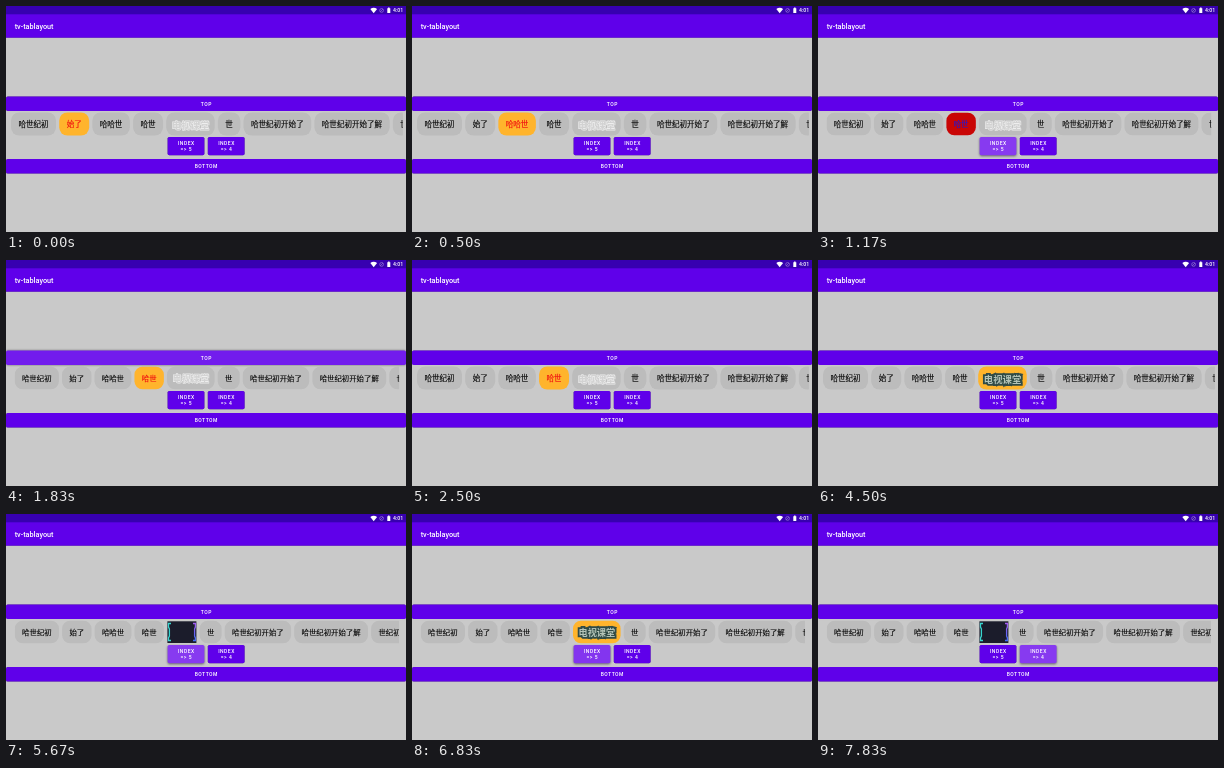
Animation, 400 px wide and 226 px high, one loop 8000 ms. Source, as an HTML page:

```html
<!DOCTYPE html>
<html lang="zh">
<head>
<meta charset="utf-8">
<title>tv-tablayout</title>
<style>
  html, body { margin: 0; width: 100%; height: 100%; overflow: hidden; background: #c9c9c9; }
  svg { display: block; width: 100%; height: 100%; }
  text { font-family: Roboto, sans-serif; font-weight: 500; fill: #fff; }
  .raised { filter: drop-shadow(0 .7px .6px #0007); }
  .label { font-size: 5px; letter-spacing: .5px; text-anchor: middle; }
  .tab text { font: 400 7.4px "Noto Sans CJK SC", "Noto Sans CJK", sans-serif; stroke-width: .15; }
  .tab .art { font-size: 9.2px; font-weight: 700; paint-order: stroke; }
</style>
</head>
<body>
<svg id="stage" viewBox="0 0 400 226" preserveAspectRatio="none">
  <defs>
    <clipPath id="rowClip"><rect x="8.8" y="106" width="384.2" height="24"/></clipPath>
    <linearGradient id="edge" x2="0" y2="1">
      <stop stop-color="#a35cf0"/><stop offset="1" stop-color="#3f6df5"/>
    </linearGradient>
  </defs>
  <rect width="400" height="226" fill="#c9c9c9"/>
  <rect class="raised" width="400" height="31.7" fill="#5f00ea"/>
  <rect width="400" height="8.3" fill="#3700b0"/>
  <text x="8.7" y="22.8" font-size="7.3">tv-tablayout</text>
  <path d="M364.3 3q3.4-2.5 6.8 0l-3.4 4.3z" fill="#fff"/>
  <g fill="none" stroke="#a48bd8" stroke-width=".6">
    <circle cx="375.6" cy="4.4" r="1.9"/><path d="M374.3 5.7l2.6-2.6"/>
  </g>
  <path d="M381.3 2.2h.8v-.6h1.4v.6h.8v4.9h-3z" fill="#fff"/>
  <text x="387" y="6.3" font-size="5.2">4:01</text>
  <g id="row"><g id="tabs" clip-path="url(#rowClip)"></g></g>
  <g id="buttons"></g>
</svg>
<script>
const LOOP = 8000, PAD = 7.3, GAP = 3.1, FONT = 7.4, ART_WIDTH = 47.6, PHOTO_WIDTH = 29.5;
const ART = 4;
const titles = ['哈世纪初', '始了', '哈哈世', '哈世', '电视课堂', '世', '哈世纪初开始了', '哈世纪初开始了解', '世纪初开始了'];

// [start, focused area, selected tab]
const steps = [
  [0, 'row', 1], [400, 'row', 2], [660, 'row', 3], [920, 'five', 3],
  [1330, 'row', 3], [1500, 'top', 3], [1800, 'row', 3], [2580, 'row', 4],
  [3170, 'five', 4], [4090, 'row', 4], [5300, 'five', 4], [6820, 'row', 4], [7400, 'four', 4]
];

const byId = id => document.getElementById(id);
function add(parent, tag, attrs, content = '') {
  const node = document.createElementNS('http://www.w3.org/2000/svg', tag);
  set(node, attrs);
  node.textContent = content;
  return parent.appendChild(node);
}
function set(node, attrs) {
  for (const key in attrs) node.setAttribute(key, attrs[key]);
}

function addButton(x, y, width, height, lines) {
  const box = add(byId('buttons'), 'rect', { x, y, width, height, rx: 1.7, class: 'raised' });
  lines.forEach((line, i) => add(byId('buttons'), 'text', {
    x: x + width / 2 + .3, y: y + height / 2 + 1.8 + (i - (lines.length - 1) / 2) * 5.9, class: 'label'
  }, line));
  return box;
}
const buttons = {
  top: addButton(0, 90.5, 400, 14.5, ['TOP']),
  bottom: addButton(0, 153.1, 400, 14.5, ['BOTTOM']),
  five: addButton(161.6, 130.9, 36.8, 18.3, ['INDEX', '=> 5']),
  four: addButton(201.8, 130.9, 36.8, 18.3, ['INDEX', '=> 4'])
};

const tabs = titles.map((title, i) => {
  const group = add(byId('tabs'), 'g', { class: 'tab' });
  const width = i === ART ? ART_WIDTH : title.length * FONT + 2 * PAD;
  const box = add(group, 'rect', { y: 106.7, width, height: 22.6, rx: 8 });
  const text = add(group, 'text', i === ART
    ? { class: 'art', x: 5.5, y: 122.5 }
    : { x: PAD, y: 120.8 }, title);
  return { group, width, box, text };
});

const photo = add(tabs[ART].group, 'g', {});
add(photo, 'rect', { x: .4, y: 107.3, width: 29, height: 21.7, fill: '#1b1c2b' });
const bracket = { fill: 'none', 'stroke-width': 1.3 };
add(photo, 'path', { ...bracket, d: 'M4 109.5H1.5V113L2.4 115V122L1.5 124V126.5H4', stroke: '#38d5cf' });
add(photo, 'path', { ...bracket, d: 'M26 109.5H28.4V113L27.6 115V122L28.4 124V126.5H26', stroke: 'url(#edge)' });

function drawTabs(rowFocused, selected) {
  let x = 8.8;
  tabs.forEach((tab, i) => {
    const active = i === selected, focused = active && rowFocused;
    const showPhoto = i === ART && active && !rowFocused;
    set(tab.group, { transform: `translate(${x} 0)` });
    set(tab.box, { fill: focused ? '#ffb42c' : active ? '#c90505' : '#bcbcbc' });
    const style = tab.text.style;
    if (i === ART) {
      const normal = showPhoto ? 'none' : 'inline';
      set(tab.box, { display: normal });
      set(tab.text, { display: normal });
      set(photo, { display: showPhoto ? 'inline' : 'none' });
      style.fill = focused ? '#b4c4b8' : '#d2d2d2';
      style.stroke = focused ? '#304b46' : '#eee';
      style.strokeWidth = focused ? 3.6 : 1;
    } else {
      style.fill = style.stroke = focused ? '#f01010' : active ? '#2b18c8' : '#080808';
    }
    x += (showPhoto ? PHOTO_WIDTH : tab.width) + GAP;
  });
}

// Level from 0 to 1 of an area's focus, eased after its latest change.
function focusLevel(area, time, duration) {
  let on = steps[0][1] === area, since = -LOOP;
  for (const [start, focus] of steps) {
    if (start > time) break;
    if ((focus === area) !== on) { on = !on; since = start; }
  }
  const p = Math.min(1, (time - since) / duration), eased = p * p * (3 - 2 * p);
  return on ? eased : 1 - eased;
}

const mix = (a, b, p) => Math.round(a + (b - a) * p);
function draw(now) {
  const time = now % LOOP;
  const [, focus, selected] = steps.filter(([start]) => start <= time).pop();
  drawTabs(focus === 'row', selected);
  const scale = 1 + .02 * focusLevel('row', time, 300);
  set(byId('row'), { transform: `translate(201 118) scale(${scale}) translate(-201 -118)` });
  for (const name in buttons) {
    const level = focusLevel(name, time, 60);
    buttons[name].style.fill = `rgb(${mix(95, 135, level)} ${mix(0, 58, level)} ${mix(234, 240, level)})`;
    buttons[name].style.filter = `drop-shadow(0 ${.7 + .5 * level}px ${.6 + .6 * level}px #0007)`;
  }
  requestAnimationFrame(() => draw(performance.now()));
}
draw(performance.now());
</script>
</body>
</html>
```
